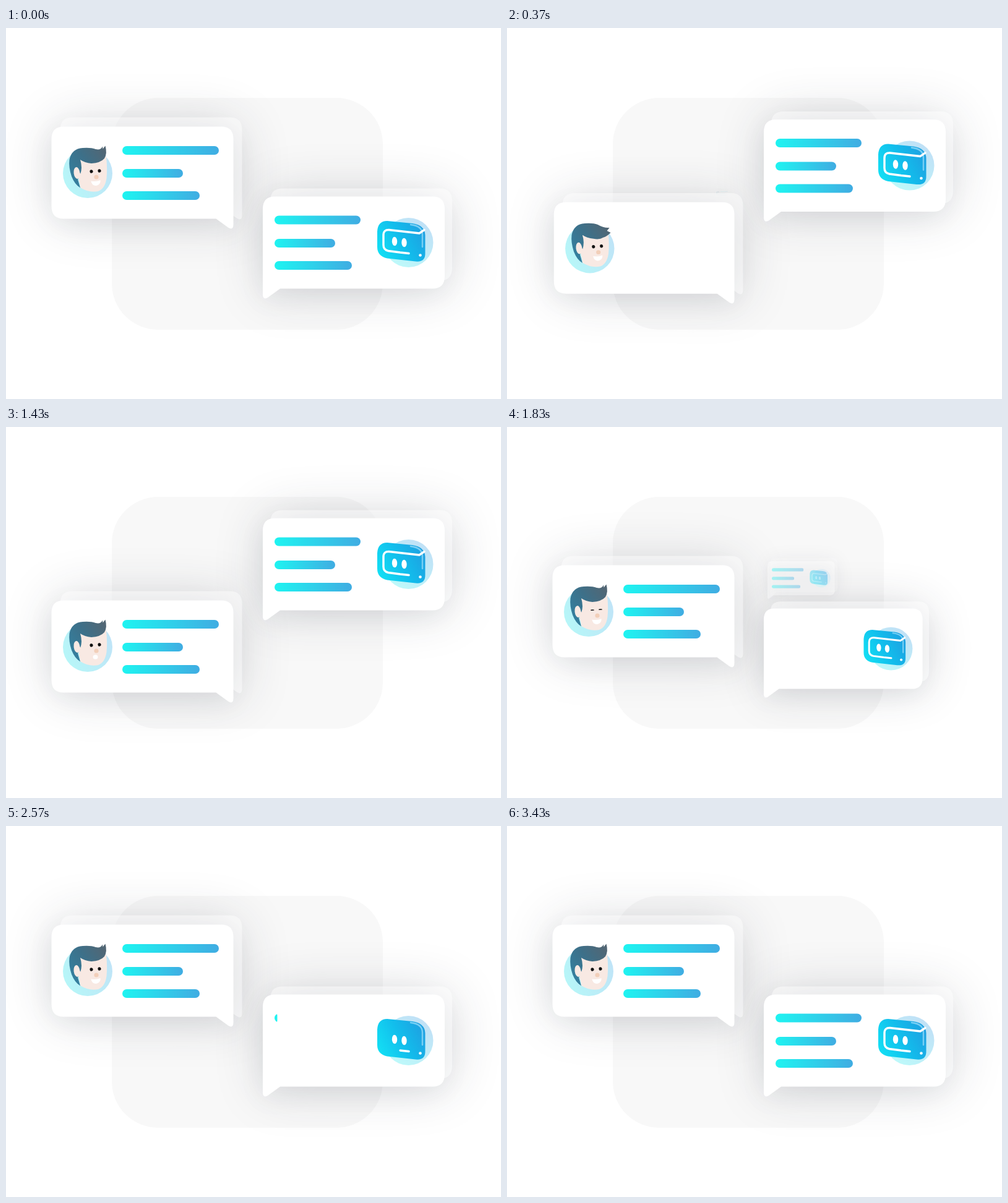
These frames come from a looping animation (800 by 600 pixels, 3460 ms). An HTML page with a canvas:

```html
<!DOCTYPE html>
<html lang="en">
<head>
<meta charset="utf-8">
<title>Chat bubbles</title>
<style>
html, body { margin: 0; width: 100%; height: 100%; overflow: hidden; background: #fff; }
canvas { display: block; width: 800px; height: 600px; }
</style>
</head>
<body>
<canvas id="stage" width="800" height="600"></canvas>
<script>
const ctx = document.getElementById('stage').getContext('2d');
const LOOP = 3460, FIRST = 10, SECOND = 1635;

const clamp = v => Math.min(1, Math.max(0, v));
const span = (t, start, length) => clamp((t - start) / length);
const mix = (a, b, k) => a + (b - a) * k;
const inOut = k => k < 0.5 ? 4 * k ** 3 : 1 - 4 * (1 - k) ** 3;
const pop = k => 1 - (1 - k) ** 5;
const shrink = k => (1 - k) ** 2;

// Bubble with its tail at the lower left; the person's one is mirrored.
const bubblePath = new Path2D(
  'M20 0H274Q294 0 294 20V129Q294 149 274 149H28L8 163.5Q0 168 0 158V20Q0 0 20 0Z');

const person = {
  x: 367.5, y: 159.5, flip: -1, sheet: [14, -15], lineX: 188,
  lines: [[198, 156], [235, 98], [271, 125]],
  popAt: [367.5, 325], shrinkAt: [358, 270], avatar: drawPerson
};
const robot = {
  x: 415, y: 272.5, flip: 1, sheet: [12, -13], lineX: 434,
  lines: [[310.5, 139], [348, 98], [384, 125]],
  popAt: [415, 438], shrinkAt: [424.5, 382.6], avatar: drawRobot
};

function gradient(x0, y0, x1, y1, ...colors) {
  const g = ctx.createLinearGradient(x0, y0, x1, y1);
  colors.forEach((c, i) => g.addColorStop(i / (colors.length - 1), c));
  return g;
}

function ellipse(x, y, rx, ry, fill, angle = 0) {
  ctx.beginPath();
  ctx.ellipse(x, y, rx, ry, angle, 0, Math.PI * 2);
  ctx.fillStyle = fill;
  ctx.fill();
}

function fillPath(d, fill) {
  ctx.fillStyle = fill;
  ctx.fill(new Path2D(d));
}

function strokePath(d, color, width) {
  ctx.strokeStyle = color;
  ctx.lineWidth = width;
  ctx.stroke(new Path2D(d));
}

function place(b) {
  const [ax, ay] = b.anchor;
  ctx.translate(ax, ay + b.dy);
  ctx.scale(b.scale, b.scale);
  ctx.translate(-ax, -ay);
  ctx.globalAlpha = b.alpha;
}

function shape(who, dx = 0, dy = 0) {
  ctx.save();
  ctx.translate(who.x + dx, who.y + dy);
  ctx.scale(who.flip, 1);
  ctx.fill(bubblePath);
  ctx.restore();
}

function castShadow(b, dx, dy, blur, color) {
  const far = 2000;
  ctx.save();
  ctx.translate(-far, 0);
  place(b);
  ctx.shadowOffsetX = far;
  ctx.shadowBlur = blur * b.scale;
  ctx.shadowColor = color;
  ctx.fillStyle = '#000';
  shape(b.who, dx, dy);
  ctx.restore();
}

function drawShadow(b) {
  castShadow(b, 7, -2, 86, 'rgba(40,45,62,0.2)');
  castShadow(b, 0, 8, 46, 'rgba(40,45,62,0.06)');
}

function drawLines(b) {
  const { lines, lineX } = b.who;
  lines.forEach(([y, width], i) => {
    const shown = width * span(b.t, b.typeAt + i * 170, 250);
    if (shown <= 0) return;
    ctx.save();
    ctx.beginPath();
    ctx.roundRect(lineX - 8, y - 8, shown + 8, 16, shown < width ? [0, 4, 4, 0] : 0);
    ctx.clip();
    ctx.beginPath();
    ctx.roundRect(lineX, y - 7, width, 14, 7);
    ctx.fillStyle = gradient(lineX, 0, lineX + width, 0, '#1ef4f1', '#2fd0ea', '#40ace2');
    ctx.fill();
    ctx.restore();
  });
}

function drawBubble(b) {
  ctx.save();
  place(b);
  ctx.fillStyle = 'rgba(255,255,255,0.45)';
  shape(b.who, ...b.who.sheet);
  ctx.fillStyle = '#fff';
  shape(b.who);
  drawLines(b);
  b.who.avatar(b.t);
  ctx.restore();
}

function drawPerson(t) {
  ellipse(132, 235, 40, 40, gradient(92, 255, 172, 215, '#b6f7f8', '#c0e3f7'));
  const lean = 3.5 * inOut(span(t, 680, 200)) * (1 - inOut(span(t, 1080, 220)));
  const sweep = 1 - inOut(span(t, 400, 250));
  const skin = '#f8e9e3';
  ctx.save();
  ctx.translate(lean, 0);
  fillPath('M116 208H162Q164 228 162.500 243Q160 260 149 264Q134 267 120 258Z', skin);

  // The forelock drops down and forward while the bubble pops in.
  const at = (x0, y0, x1, y1) => `${mix(x0, x1, sweep)} ${mix(y0, y1, sweep)}`;
  const hair = `M120 258.500Q111 253 106 240Q101 225 102.500 213
    Q106 195 124 194Q137 193 145 196
    Q${at(153, 198, 155, 202)} ${at(156, 191.500, 164, 201)}
    L${at(156.500, 195.500, 160, 206)}L${at(160.500, 190.500, 166, 209)}
    Q${at(164, 203, 160, 215)} ${at(159, 211, 154, 217)}
    Q${at(153, 218, 148, 221)} 138 219Q127 218 120 213Q124 226 120 237L116 245Z`;
  fillPath(hair, gradient(104, 240, 161, 200, '#347f9e', '#3d7089', '#526674'));
  ellipse(114.5, 234.5, 5, 9.5, skin, -0.12);
  fillPath('M116 232L121 236L121 258L118 247Z', skin);

  const blink = Math.max(...[970, 1830, 2940].map(c => clamp(2 - Math.abs(t - c) / 50)));
  const eyeRx = mix(2.6, 3, blink), eyeRy = mix(2.7, 0.8, blink);
  ellipse(138, 232, eyeRx, eyeRy, '#111', -0.05);
  ellipse(151, 231, eyeRx, eyeRy, '#111', -0.05);
  ellipse(146, 241, 3.6, 3.5, '#f2cfb9');

  if (t > 720 && t < 1560) {
    const open = 0.5 + 0.5 * Math.cos((t - 1430) / 306.7 * Math.PI * 2);
    ellipse(144.5, mix(253, 251, open), 4, mix(1.2, 3.6, open), '#fff', -0.08);
  } else {
    fillPath('M137.500 247.500Q146 249 152.500 246C154 256 139 259 137.500 247.500Z', '#fff');
  }
  ctx.restore();
}

function drawRobot(t) {
  ellipse(650.5, 347, 40, 40, gradient(625, 380, 676, 314, '#bdf9fa', '#c0e0f6'));
  fillPath(`M616 312L657 316Q677 319 677.500 335V364Q678 379 662 377.500
    L616 372.500Q600 369 600 354V329Q601 312 616 312Z`,
    gradient(600, 360, 676, 322, '#13dff4', '#12bdec', '#1f9ee0'));
  ctx.lineCap = 'round';
  ctx.lineJoin = 'round';
  strokePath('M654 318Q673 320 673 334V354', 'rgba(150,220,250,0.75)', 2.5);
  ellipse(628, 345, 4.2, 7.2, '#fff', -0.04);
  ellipse(643.5, 347, 4.2, 7.2, '#fff', -0.04);
  ellipse(669.5, 367.5, 2.3, 2.3, '#fff');

  // The screen outline retracts until only the mouth is left.
  const outline = 1 - inOut(span(t, 2150, 300)) + inOut(span(t, 3000, 400));
  ctx.setLineDash([mix(14, 180, outline), 400]);
  strokePath('M651 364.500L637 363L618 360.500Q610 359 610 351V335Q610 326 619 326.500L668 332L676 326.500',
    '#fff', 3.4);
  ctx.setLineDash([]);
}

function bubblesAt(t) {
  const list = [];
  const add = (who, dy, scale, alpha, anchor, typeAt, time) => {
    if (scale > 0.01) list.push({ who, dy, scale, alpha, anchor, typeAt, t: time });
  };
  const leaving = start => shrink(span(t, start, 500));
  const entering = start => pop(span(t, start, 580));
  const rising = start => inOut(span(t, start, 400));

  const oldPerson = leaving(FIRST), oldRobot = leaving(SECOND);
  add(person, 0, oldPerson, oldPerson, person.shrinkAt, 768, t + LOOP);
  add(robot, -125 * rising(FIRST), oldRobot, oldRobot, robot.shrinkAt, 0, t < SECOND ? LOOP : t + LOOP);
  add(person, 121 * (1 - rising(SECOND)), entering(FIRST), 1, person.popAt, 768, t);
  add(robot, 0, entering(SECOND), 1, robot.popAt, 2563, t);
  return list;
}

function draw(t) {
  ctx.fillStyle = '#fff';
  ctx.fillRect(0, 0, 800, 600);
  ctx.beginPath();
  ctx.roundRect(171, 113, 438, 375, 75);
  ctx.fillStyle = '#f8f8f8';
  ctx.fill();
  const bubbles = bubblesAt(t);
  bubbles.forEach(drawShadow);
  bubbles.forEach(drawBubble);
}

const begin = performance.now();
function tick() {
  draw((performance.now() - begin) % LOOP);
  requestAnimationFrame(tick);
}
tick();
</script>
</body>
</html>
```
